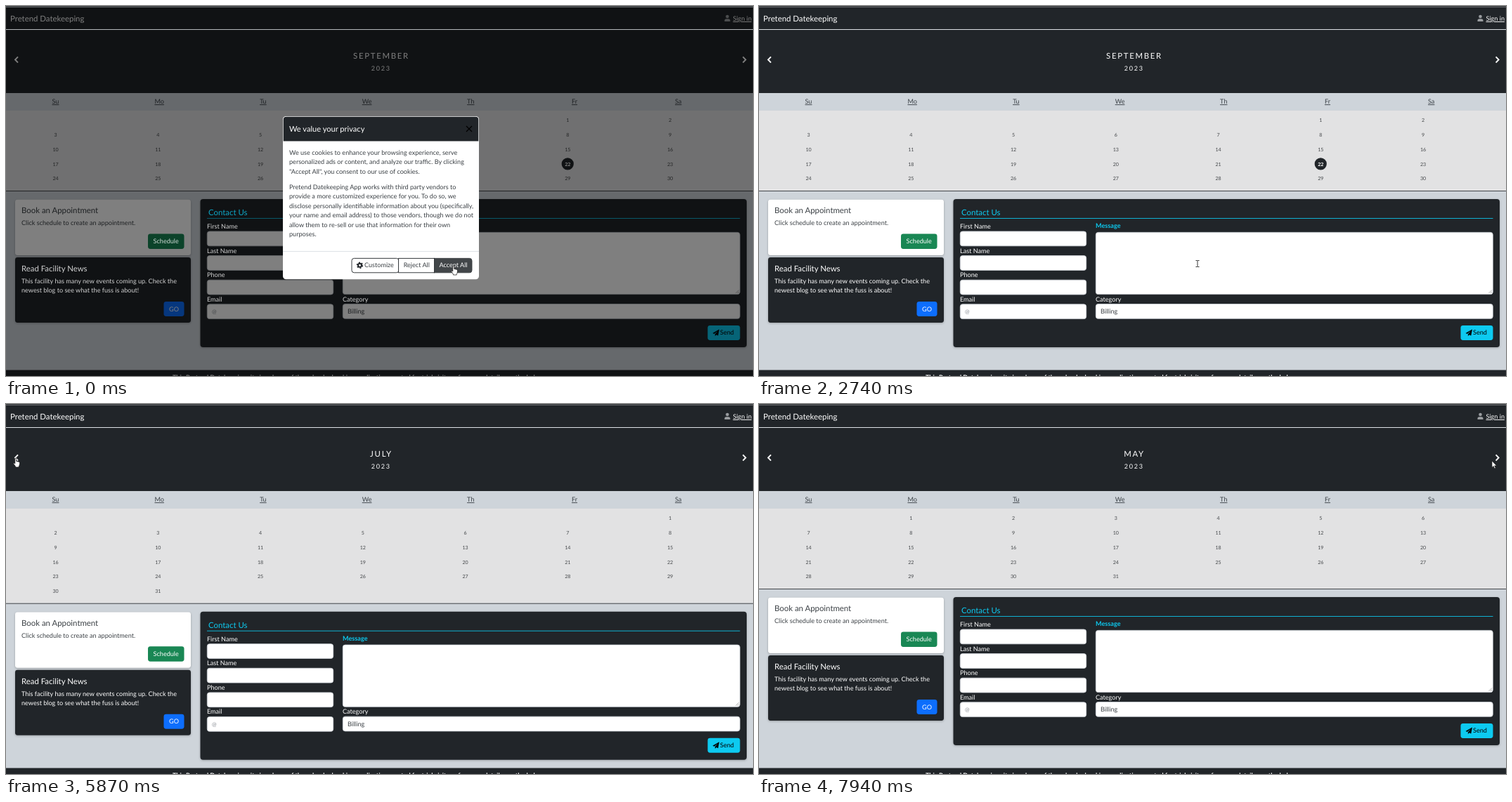
Recreate the animation shown at these times as an HTML page. Size 1063x527 px, loop 8 s.

```html
<!DOCTYPE html>
<html lang="en">
<head>
<meta charset="utf-8">
<title>Calendar</title>
<style>
html, body { margin: 0; width: 100%; height: 100%; overflow: hidden; background: #ced4da; }
svg { display: block; }
text { font: 9.1px Lato, "Open Sans", sans-serif; fill: #3b4045; white-space: pre; text-rendering: geometricPrecision; }
.h { font-size: 11.4px; }
.b { font-weight: 700; }
.w { fill: #fff; }
.c { text-anchor: middle; }
.u { text-decoration: underline; }
.cyan { fill: #0dcaf0; }
.dark { fill: #212529; }
.wide { letter-spacing: 1.7px; }
.field { fill: #fff; stroke: #ced4da; stroke-width: .8; }
.chev { fill: none; stroke: #fff; stroke-width: 1.9; }
.card { filter: drop-shadow(0 1px 1.5px rgba(0, 0, 0, .25)); }
#week text { fill: #3a4046; text-anchor: middle; }
#days text { font-size: 7.1px; fill: #45484b; text-anchor: middle; }
#days .today { fill: #fff; font-weight: 700; }
#lit.dim { opacity: .8; }
.btn rect { fill: #fff; stroke: #212529; stroke-width: .9; }
.btn.on rect { fill: #212529; }
.btn.on text { fill: #fff; }
.btn.on .gear { stroke: #fff; }
.gear { fill: none; stroke: #212529; }
#accept rect { fill: #212529; }
#accept.on rect { fill: #424649; stroke: #373b3e; }
#accept text { fill: #fff; }
</style>
</head>
<body>
<svg width="1063" height="527" viewBox="0 0 1063 527">
  <rect width="1063" height="527" fill="#ced4da"/>

  <!-- navigation and month header -->
  <rect y="2" width="1063" height="122" class="dark"/>
  <text id="brand" class="h w" x="6" y="22"></text>
  <g fill="#9a9da0">
    <circle cx="1026.5" cy="15" r="2.3"/>
    <path d="M1022.5 22v-1.2q0-2.6 2.6-2.6h2.8q2.6 0 2.6 2.6V22z"/>
  </g>
  <text class="w u" x="1034.5" y="21">Sign in</text>
  <text id="month" class="h w c wide" x="534" y="75"></text>
  <text class="w c wide" x="533.8" y="91.8">2023</text>
  <path class="chev" d="M17 72.3l-4 4.2 4 4.2M1048.6 72.3l4 4.2-4 4.2"/>

  <g id="week"></g>
  <rect id="grid" y="149" width="1063" height="114" fill="#e2e2e3"/>
  <g id="days"></g>

  <g id="lower">
    <rect y="263" width="1063" height="1" fill="#43474b"/>

    <rect class="card" x="13" y="275.7" width="250" height="79.3" rx="3.4" fill="#fff"/>
    <text class="h" x="22" y="295">Book an Appointment</text>
    <text x="22" y="312">Click schedule to create an appointment.</text>
    <rect x="202" y="324.5" width="51.5" height="21.5" rx="3.4" fill="#198754"/>

    <rect class="card dark" x="13" y="358" width="250" height="93" rx="3.4"/>
    <rect x="224.5" y="421" width="29" height="21" rx="3.4" fill="#0d6efd"/>
    <text class="w c" x="239" y="434.5">GO</text>

    <rect class="card dark" x="276.5" y="275" width="777.5" height="211" rx="4"/>
    <rect x="286" y="302" width="758.5" height="1" fill="#0dcaf0" opacity=".85"/>
    <g id="fields"></g>
    <text x="293" y="438" style="font-size:8px;fill:#8b9096">@</text>
    <rect class="field" x="479.3" y="322.4" width="565" height="88.2" rx="3.4"/>
    <path d="M1038.5 409l4.5-4.5M1041 409l2-2" stroke="#888" stroke-width=".7"/>
    <rect class="field" x="479.3" y="424.5" width="565" height="20.8" rx="3.4"/>
    <text x="486" y="438">Billing</text>
    <rect class="cyan" x="998.5" y="455" width="46" height="21" rx="3.4"/>
    <path d="M1015 460.5l-9.5 5.5 2.4 1.1 5-4.4-4 4.9v2.6l1.6-1.9 2.8 1.2z" fill="#000"/>
    <text x="1016" y="468.4" style="fill:#000">Send</text>
  </g>

  <rect y="518.5" width="1063" height="8.5" class="dark"/>
  <text id="foot" class="w b" x="237" y="532"></text>
  <rect width="1063" height="1" fill="#2f3235"/>
  <rect y="1" width="1063" height="1" fill="#66696c"/>

  <rect id="shade" y="2" width="1063" height="525" opacity=".5"/>

  <!-- bright labels, which the shade hardly darkens -->
  <g id="lit">
    <rect y="33" width="1063" height="1" fill="#dee2e6"/>
    <g id="labels">
      <text class="w c" x="227.7" y="338.3">Schedule</text>
      <text class="h w" x="22" y="378">Read Facility News</text>
      <text class="w" x="22" y="395">This facility has many new events coming up. Check the</text>
      <text class="w" x="22" y="408.4">newest blog to see what the fuss is about!</text>
      <text class="h cyan" x="288" y="298">Contact Us</text>
      <g id="captions"></g>
      <text class="cyan b" x="479" y="316">Message</text>
      <text class="w" x="479" y="420.5">Category</text>
    </g>
  </g>

  <g id="modal">
    <rect x="394" y="157" width="279" height="232.3" rx="4.5" fill="#fff"/>
    <path class="dark" d="M394.7 192.5V162q0-4.3 4.3-4.3h269q4.3 0 4.3 4.3v30.5z"/>
    <text class="w" x="403" y="178.8" style="font-size:11.1px">We value your privacy</text>
    <path d="M655 171l8 8m0-8l-8 8" stroke="#000" stroke-width="1.2"/>
    <g id="copy"></g>
    <rect x="394" y="349" width="279" height="1" fill="#dee2e6"/>
    <g id="custom" class="btn">
      <rect x="492" y="359.4" width="67" height="20.4" rx="3.4"/>
      <g class="gear">
        <circle cx="503.5" cy="369.3" r="2.5" stroke-width="2"/>
        <circle cx="503.5" cy="369.3" r="4" stroke-width="1.4" stroke-dasharray="2.09"/>
      </g>
      <text x="510" y="372.4">Customize</text>
    </g>
    <g id="accept" class="btn">
      <rect x="606" y="359.4" width="57" height="20.4" rx="3.4"/>
      <text class="c" x="636.5" y="372.4">Accept All</text>
    </g>
    <g id="reject" class="btn">
      <rect x="558.6" y="359.4" width="51" height="20.4"/>
      <text class="c" x="584.3" y="372.4">Reject All</text>
    </g>
  </g>

  <g id="cursor">
    <path id="arrow" d="M0 0v9.4l2.2-2 1.5 3.5 1.5-.7-1.5-3.3h2.9z" fill="#fff" stroke="#111" stroke-width=".6"/>
    <path id="hand" d="M-1.2 1q0-1 1-1t1 1v3.5l3.4.7q1.6.4 1.5 1.8l-.6 3.3-.8 1.3v1.4h-4.9v-1.2l-2.6-3.6q-.5-1 .4-1.3l1.6 1z" fill="#fff" stroke="#111" stroke-width=".7"/>
    <path id="beam" d="M-2.5-4.5h2l.5.5.5-.5h2M0-4v8M-2.5 4.5h2l.5-.5.5.5h2" fill="none" stroke="#222" stroke-width=".9"/>
  </g>
</svg>

<script>
const $ = id => document.getElementById(id);
const BRAND = 'Pretend Datekeeping';
const LOOP = 8000, ROW = 20.7;

const label = (x, y, s, cls = '') => `<text x="${x}" y="${y}" class="${cls}">${s}</text>`;
const show = (id, on) => { $(id).style.display = on ? '' : 'none'; };

$('brand').textContent = BRAND;
$('foot').textContent = `This ${BRAND} site is a demo of the calendar booking application created for trial visitors, for more details see the help.`;
$('week').innerHTML = ['Su', 'Mo', 'Tu', 'We', 'Th', 'Fr', 'Sa']
  .map((d, i) => label(70.5 + i * 147.7, 139.2, d, 'u')).join('');
['First Name', 'Last Name', 'Phone', 'Email'].forEach((s, i) => {
  const y = 317 + i * 34.6;
  $('captions').innerHTML += label(286, y, s, 'w');
  $('fields').innerHTML +=
    `<rect class="field" x="286.3" y="${y + 4}" width="179.4" height="20.8" rx="3.4"/>`;
});
$('copy').innerHTML = [
  [211.8, ['We use cookies to enhance your browsing experience, serve',
    'personalized ads or content, and analyze our traffic. By clicking',
    '"Accept All", you consent to our use of cookies.']],
  [261, [`${BRAND} App works with third party vendors to`,
    'provide a more customized experience for you. To do so, we',
    'disclose personally identifiable information about you (specifically,',
    'your name and email address) to those vendors, though we do not',
    'allow them to re-sell or use that information for their own',
    'purposes.']]
].map(([y, lines]) => lines.map((s, i) => label(403, y + i * 13.4, s)).join('')).join('');

// month index shown from each time on
const months = [[0, 8], [5470, 7], [5870, 6], [6170, 5], [6730, 4]];
const names = { 4: 'MAY', 5: 'JUNE', 6: 'JULY', 7: 'AUGUST', 8: 'SEPTEMBER' };
let shown = -1;

function showMonth(m) {
  if (m === shown) return;
  shown = m;
  const first = new Date(2023, m, 1).getDay();
  const count = new Date(2023, m + 1, 0).getDate();
  const extra = (Math.ceil((first + count) / 7) - 5) * ROW;
  let out = '';
  for (let d = 1; d <= count; d++) {
    const cell = first + d - 1;
    const x = 70.5 + cell % 7 * 145.75, y = 162.8 + Math.floor(cell / 7) * ROW;
    const today = m === 8 && d === 22;
    if (today) out += `<circle cx="${x}" cy="${y}" r="8.6" fill="#212529"/>`;
    out += label(x, y + 2.6, d, today ? 'today' : '');
  }
  $('days').innerHTML = out;
  $('month').textContent = names[m];
  $('grid').setAttribute('height', 114 + extra);
  for (const id of ['lower', 'labels']) $(id).setAttribute('transform', `translate(0 ${extra})`);
}

// pointer moves: first step, last step, steps, end x, end y, bend in y, easing
const smooth = p => p * p * (3 - 2 * p);
const linear = p => p;
const moves = [
  [530, 1490, 8, 524, 371, 7, smooth],
  [1610, 2030, 4, 624, 367, 0, smooth],
  [2867, 3760, 8, 520, 128, 0, p => p ** 1.5],
  [3880, 4870, 8, 19, 78, 0, p => 1 - (1 - p) ** 3.32],
  [5020, 5320, 3, 14, 77, 0, linear],
  [6863, 7660, 7, 1016, 87, 4, smooth],
  [7810, 7940, 2, 1043, 81, 0, linear]
];

function pointer(t) {
  let x = 637, y = 370;
  for (const [t0, t1, n, ex, ey, bend, ease] of moves) {
    if (t < t0) break;
    const step = Math.floor((t - t0) / (t1 - t0) * (n - 1) + 1e-6) + 1;
    const p = ease(Math.min(step, n) / n);
    x += (ex - x) * p;
    y += (ey - y) * p + bend * 4 * p * (1 - p);
  }
  return [x, y];
}

const start = performance.now();
function draw() {
  const t = (performance.now() - start) % LOOP;
  const open = t < 2740;
  const [x, y] = pointer(t);

  showMonth(months.filter(m => t >= m[0]).pop()[1]);
  show('modal', open);
  show('shade', open);
  $('lit').classList.toggle('dim', open);
  $('custom').classList.toggle('on', x < 558.5);
  $('reject').classList.toggle('on', x >= 558.5 && x < 609.5);
  $('accept').classList.toggle('on', x >= 609.5);

  const kind = open || x < 17 ? 'hand'
    : x > 479 && x < 1044 && y > 322 && y < 411 ? 'beam' : 'arrow';
  for (const k of ['arrow', 'hand', 'beam']) show(k, k === kind);
  $('cursor').setAttribute('transform', `translate(${x.toFixed(1)} ${y.toFixed(1)})`);
  requestAnimationFrame(draw);
}
draw();
</script>
</body>
</html>
```
